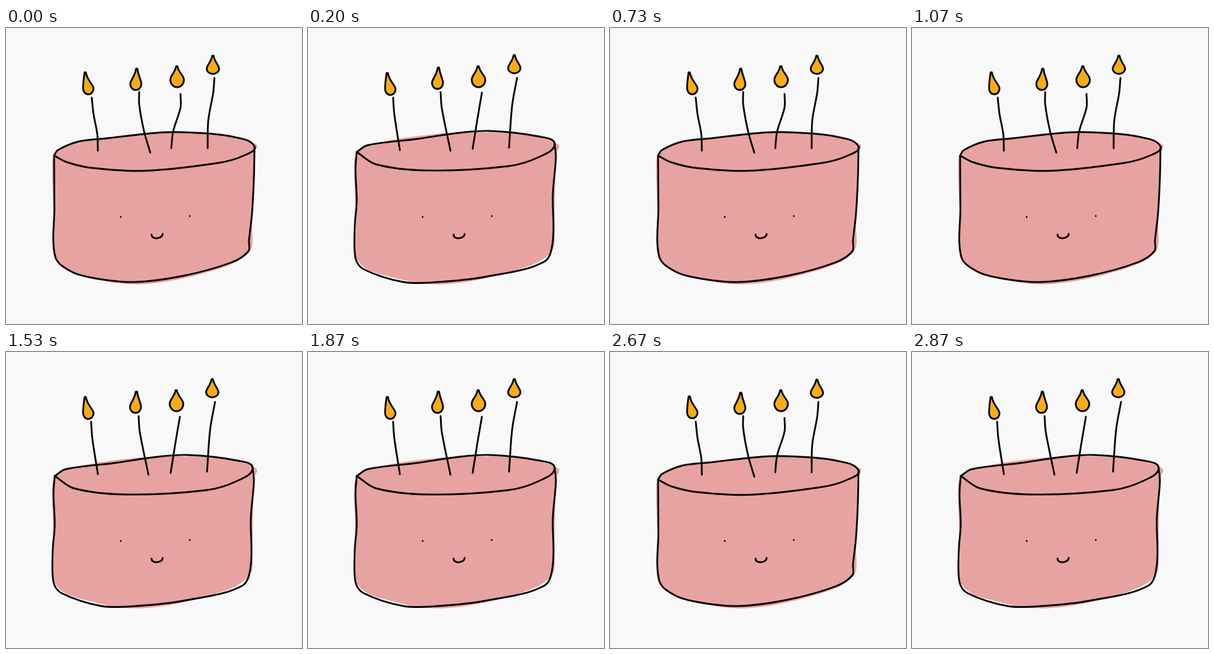
These frames come from a looping animation (480x480 px, 3070 ms). An HTML page:

```html
<!DOCTYPE html>
<html lang="en">
<head>
<meta charset="utf-8">
<title>Birthday cake</title>
<style>
  html, body { margin: 0; height: 100%; overflow: hidden; background: #f8f8f8; }
  svg { display: block; width: 100%; height: 100%; }
  .line { fill: none; stroke: #080606; stroke-width: 2.9; stroke-linecap: round; stroke-linejoin: round; }
  .flame { fill: #f4ac1c; }
  .icing { fill: #e7a3a1; }
</style>
</head>
<body>
<svg id="stage" viewBox="0 0 480 480"></svg>
<script>
const LOOP = 3070;
const TICK = 1000 / 15;

// Key points of each stroke, joined by a smooth curve.
const icing = "75,240 78,204 98,191 165,177 260,169 360,174 406,189 402,206 399,320 394,364 330,395 220,415.5 140,405 82,379 78,320 75,240";

const flames = [
  { tip: [128.5, 72], body: [133.5, 98], radii: [8.5, 9.5] },
  { tip: [212, 66], body: [210.5, 91], radii: [9, 9.5] },
  { tip: [277, 62], body: [277.5, 84], radii: [11, 12] },
  { tip: [335.5, 45], body: [335.5, 66], radii: [10, 8.5] }
];

const poses = [
  {
    rim: "78,207 84,198 118,184 163,179 250,169.5 300,169.5 366,176 403,192 383,208 343,219 225,231.5 140,227 100,218 78,207",
    side: "403,192 402,243 399,300 394,345 393,362 366,380 287,402 208,412 145,406 106,395 80,371 78.5,290 78,207",
    candles: [
      "139,113 142,140 148,172 149,199",
      "216,104 216,124 224,168 234,202",
      "283,107 283,129 271,168 268,195",
      "338,81 336,105 328,150 327,195"
    ],
    sway: [[0, 0], [0, 0], [0, 0], [0, 0]]
  },
  {
    rim: "79,201 97,190 176,180 245,170 295,167 375,176 400,188 375,209 325,224 193,231 110,221 79,201",
    side: "400,188 402,210 397,270 397,345 383,379 290,403 210,412 155,412 90,391 77,373 76,320 79,280 77,230 79,201",
    candles: [
      "138,113 140,140 149,198",
      "215,104 217,130 231,199",
      "282,105 274,152 267,196",
      "339,81 331,126 326,194"
    ],
    sway: [[0, 1], [-0.5, -1.8], [-1, 0], [-1, -1]]
  }
];

// Handles follow the neighbours' direction and take a third of the segment's length.
function smooth(keys) {
  const points = keys.split(" ").map(pair => pair.split(",").map(Number));
  const handle = (i, length) => {
    const [x0, y0] = points[Math.max(0, i - 1)];
    const [x1, y1] = points[Math.min(points.length - 1, i + 1)];
    const scale = length / Math.hypot(x1 - x0, y1 - y0);
    return [points[i][0] + (x1 - x0) * scale, points[i][1] + (y1 - y0) * scale];
  };
  return points.slice(1).reduce((d, [x, y], i) => {
    const third = Math.hypot(x - points[i][0], y - points[i][1]) / 3;
    return `${d}C${handle(i, third)} ${handle(i + 1, -third)} ${x},${y}`;
  }, `M${points[0]}`);
}

// A round body drawn up into a narrow, blunt tip.
function teardrop({ tip: [tx, ty], body: [cx, cy], radii: [rx, ry] }) {
  const neck = ty + (cy - ty) * 0.5;
  const shoulder = cy - ry * 0.6;
  return `M${tx + 1},${ty}C${tx + 3},${neck} ${cx + rx},${shoulder} ${cx + rx},${cy}`
    + `A${rx},${ry} 0 0 1 ${cx - rx},${cy}C${cx - rx},${shoulder} ${tx - 3},${neck} ${tx - 1},${ty}Z`;
}

const path = (d, kind) => `<path class="${kind}" d="${d}"/>`;
const eye = (x, y) => `<circle cx="${x}" cy="${y}" r="1.4" fill="#080606"/>`;

const drawPose = ({ rim, side, candles, sway }) => `<g class="pose">${
  [rim, side, ...candles].map(keys => path(smooth(keys), "line")).join("")}${
  flames.map((flame, i) =>
    `<g transform="translate(${sway[i]})">${path(teardrop(flame), "line flame")}</g>`).join("")}</g>`;

const stage = document.getElementById("stage");
stage.innerHTML = path(smooth(icing), "icing")
  + eye(186, 306.5) + eye(298, 305)
  + path("M236,335C236,344 254,342 254,334", "line")
  + poses.map(drawPose).join("");
const groups = stage.querySelectorAll(".pose");

// Three ticks of the first pose, then two of the second; the loop ends on the second.
function poseAt(time) {
  const tick = Math.floor((time + 4) / TICK);
  return tick >= 43 || tick % 5 >= 3 ? 1 : 0;
}

const start = performance.now();
function render(now) {
  const current = poseAt(Math.max(0, now - start) % LOOP);
  groups.forEach((group, i) => group.style.display = i === current ? "" : "none");
  requestAnimationFrame(render);
}
render(start);
</script>
</body>
</html>
```
